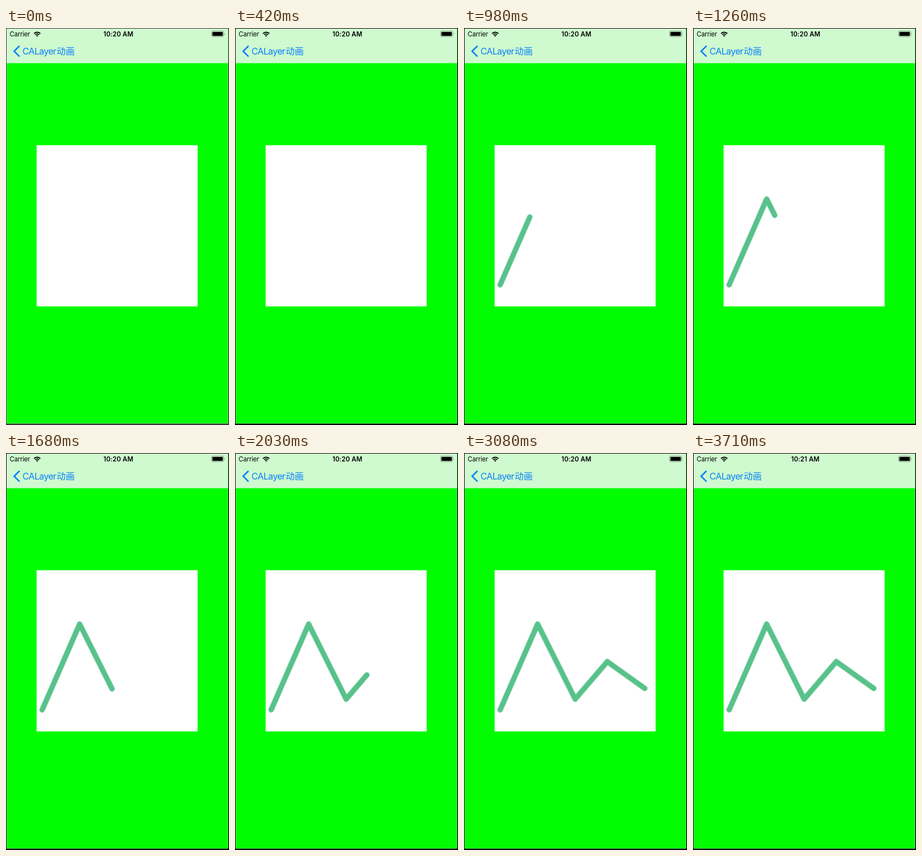
An HTML page for the animation above (3780 ms loop, 396 by 704 pixels).

```html
<!DOCTYPE html>
<html lang="en">
<head>
<meta charset="utf-8">
<title>Line drawing</title>
<style>
  html, body { margin: 0; width: 100%; height: 100%; overflow: hidden; background: #000; }
  svg { display: block; width: 396px; height: 704px; }
  text { font-family: Inter, "Noto Sans CJK SC", "Noto Sans CJK", sans-serif; }
  .status { font-size: 11.4px; }
  .clock { font-weight: 600; text-anchor: middle; letter-spacing: .1px; }
  .back { font-size: 16px; fill: #0880f8; }
  .latin { letter-spacing: -.65px; }

  .frame, .line, .before, .after { animation: 3780ms infinite step-end; }
  .frame { animation-name: frame; }
  .before { animation-name: before; }
  .after { animation-name: after; }
  .line {
    animation-name: draw, appear;
    fill: none;
    stroke: #58c28b;
    stroke-width: 10;
    stroke-linecap: round;
    stroke-linejoin: round;
  }

  @keyframes frame { 0% { fill: #383838; } 1.85%, 100% { fill: #000; } }
  @keyframes before { 0% { opacity: 1; } 98.14%, 100% { opacity: 0; } }
  @keyframes after { 0% { opacity: 0; } 98.14%, 100% { opacity: 1; } }
  @keyframes appear { 0% { opacity: 0; } 12.95%, 100% { opacity: 1; } }
  /* One step every 70 ms */
  @keyframes draw {
    0% { stroke-dasharray: 0 2; }
    11.11% { stroke-dasharray: 0 2; animation-timing-function: steps(4); }
    18.51% { stroke-dasharray: .133 2; animation-timing-function: steps(8); }
    33.33% { stroke-dasharray: .409 2; animation-timing-function: steps(6); }
    44.44% { stroke-dasharray: .608 2; animation-timing-function: steps(5); }
    53.7% { stroke-dasharray: .767 2; animation-timing-function: steps(7); }
    66.66%, 100% { stroke-dasharray: 1 2; }
  }
</style>
</head>
<body>
<svg viewBox="0 0 396 704">
  <rect class="frame" width="396" height="704"/>
  <rect x="1" y="1" width="393.5" height="700.5" fill="#02fd02"/>
  <rect x="1" y="1" width="393.5" height="61.4" fill="#cffacf"/>
  <path d="M1.5 62V701H394V62" fill="none" stroke="#fff" stroke-opacity=".35"/>

  <text class="status" x="6.5" y="15" letter-spacing="-.15">Carrier</text>
  <g transform="translate(55.4 15.6)" fill="none" stroke="#000" stroke-width="1.9">
    <path d="M-5.7-5.7A8 8 0 0 1 5.7-5.7M-3.5-3.5A5 5 0 0 1 3.5-3.5"/>
    <path d="M0 0L-2-2A2.9 2.9 0 0 1 2-2Z" fill="#000" stroke="none"/>
  </g>
  <text class="status clock before" x="199.5" y="15">10:20 AM</text>
  <text class="status clock after" x="199.5" y="15">10:21 AM</text>
  <rect x="365" y="5.6" width="21.5" height="9.8" rx="2.3" fill="none" stroke="#000" stroke-opacity=".4"/>
  <rect x="366.5" y="7.1" width="18.5" height="6.8" rx="1"/>
  <path d="M387.7 8.8q1.6 1.7 0 3.4z" fill-opacity=".5"/>

  <path d="M24 31.8L14.4 41.2L24 50.6" fill="none" stroke="#0880f8" stroke-width="2.6"/>
  <text class="back" x="29.3" y="47"><tspan class="latin">CALayer</tspan><tspan x="90">动画</tspan></text>

  <rect x="54.4" y="207.8" width="285.9" height="285.9" fill="#fff"/>
  <path class="line" transform="translate(54.7 208.2) scale(.951)" pathLength="1" d="M10 260L80 100L150 240L210 170L280 220"/>
</svg>
</body>
</html>
```
